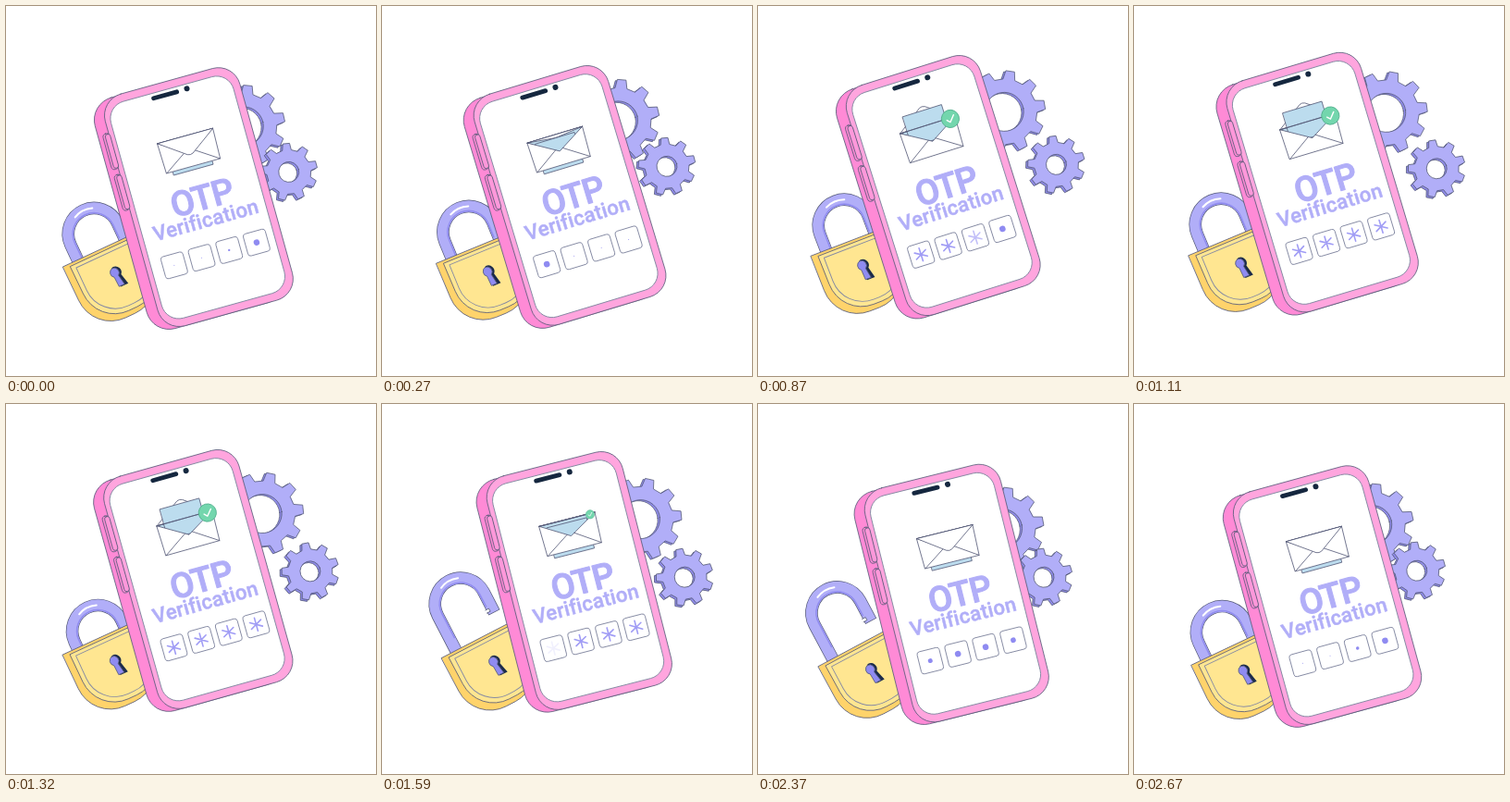
An HTML page for the animation above (2.7 s loop, 400 by 400 pixels).

```html
<!DOCTYPE html>
<html lang="en">
<head>
<meta charset="utf-8">
<title>OTP Verification</title>
<style>
  html, body { margin: 0; width: 100%; height: 100%; overflow: hidden; background: #fff; }
  svg { display: block; width: 100vw; height: 100vh; }
  .line { stroke: #555a78; stroke-width: .75; stroke-linejoin: round; stroke-linecap: round; }
  .soft { stroke: #858aa3; stroke-width: .9; stroke-linejoin: round; }
  .none { fill: none; }
  text {
    font-family: Roboto, "Open Sans", sans-serif; font-weight: 500; text-anchor: middle;
    fill: #b1aef8; stroke: #b1aef8; stroke-linejoin: round;
  }
</style>
</head>
<body>
<svg viewBox="0 0 400 400">
  <g id="bigGear"></g>
  <g id="smallGear"></g>

  <g id="lock">
    <g id="shackle" fill="none">
      <path d="M-32 6V-50A27.8 27.8 0 0 1 23.8-50V-25" stroke="#555a78" stroke-width="13.6"/>
      <path d="M-32 6V-50A27.8 27.8 0 0 1 23.8-50V-25.7" stroke="#b1aef8" stroke-width="12.2"/>
      <path d="M-27-20V-50A22.8 22.8 0 0 1 18.8-50V-34" stroke="#918df0" stroke-width="1.6"/>
      <path d="M-15-75Q-5-80 6-76" stroke="#fff" stroke-width="2" stroke-linecap="round"/>
      <path d="M16.4-31.5H20.5V-28H16.4" fill="#fff" class="line"/>
    </g>
    <path id="lockSide" class="line" fill="#ffd36b"/>
    <path id="lockFace" class="line" fill="#ffe691"/>
    <path id="lockRim" class="soft none"/>
    <path d="M-1-9A6.5 6.5 0 0 1 4 2L7 14H-2L-3 2A6.5 6.5 0 0 1-1-9Z" fill="#1b2b4b"/>
    <path d="M-2-8A5.4 5.4 0 0 1 1 1.8L3 13H-3.5L-4 1.8A5.4 5.4 0 0 1-2-8Z" fill="#8f8bf1" class="line"/>
  </g>

  <g id="phone">
    <g transform="translate(207 207) rotate(-15.5)">
      <rect x="-86" y="-129" width="154" height="259" rx="25" fill="#ff8ad6" class="line"/>
      <rect x="-74" y="-130" width="151" height="260" rx="24" fill="#ffa5de" class="line"/>
      <g class="line" fill="#ff8ad6">
        <rect x="-81" y="-93" width="7.5" height="40" rx="3.7"/>
        <rect x="-81" y="-47" width="7.5" height="40" rx="3.7"/>
        <rect x="-78.5" y="-92" width="5.5" height="38" rx="2.7" fill="#ff98da"/>
        <rect x="-78.5" y="-46" width="5.5" height="38" rx="2.7" fill="#ff98da"/>
      </g>
      <rect x="-68.5" y="-121.5" width="137.5" height="243" rx="19" fill="#fff" class="soft"/>
      <path d="M-17-116H9" stroke="#15273f" stroke-width="4.8" stroke-linecap="round"/>
      <circle cx="20.4" cy="-116.5" r="3" fill="#15273f"/>

      <path id="flapBack" fill="#fff" class="line"/>
      <path id="inside" d="M-26-67.5H36L5-47Z" fill="#bfdded" class="line"/>
      <path id="letter" d="M-18-64H26V-30H-18Z" fill="#bcdcee" class="line"/>
      <path d="M-26-67.5L5-49L36-67.5L35-34H-25Z" fill="#fff" class="line"/>
      <path d="M-25-34L1-51.4M35-34L9-51.4" class="line none"/>
      <path id="flapFront" fill="#fff" class="line"/>
      <g id="badge">
        <circle r="9.6" fill="#73d6ad" stroke="#4fae8b" stroke-width=".8"/>
        <path d="M-4 .5L-1 3.5L4.5-3" fill="none" stroke="#fff" stroke-width="1.4" stroke-linecap="round" stroke-linejoin="round"/>
      </g>

      <text x="4.5" y="14.5" font-size="37.5" letter-spacing="-.8" stroke-width="1.1">OTP</text>
      <text x="2.2" y="33.7" font-size="22.2" letter-spacing=".25" stroke-width=".5">Verification</text>
      <g id="code"></g>
    </g>
  </g>
</svg>
<script>
const LOOP = 2700;
const $ = id => document.getElementById(id);
const set = (el, name, value) => el.setAttribute(name, value);

function add(parent, tag, attrs) {
  const el = document.createElementNS('http://www.w3.org/2000/svg', tag);
  for (const k in attrs) set(el, k, attrs[k]);
  return parent.appendChild(el);
}

// Smooth step from 0 to 1 between a and b
function ramp(t, a, b) {
  const p = Math.min(1, Math.max(0, (t - a) / (b - a)));
  return p * p * (3 - 2 * p);
}

// Value eased through [time, value] pairs
function keyed(t, keys) {
  let v = keys[0][1];
  for (let i = 1; i < keys.length; i++)
    v += (keys[i][1] - keys[i - 1][1]) * ramp(t, keys[i - 1][0], keys[i][0]);
  return v;
}

function gearPath(teeth, root, tip, hole) {
  const step = 2 * Math.PI / teeth, pts = [];
  for (let i = 0; i < teeth; i++)
    for (const [off, r] of [[-.29, root], [-.17, tip], [.17, tip], [.29, root]]) {
      const a = (i + off) * step;
      pts.push((r * Math.cos(a)).toFixed(2) + ' ' + (r * Math.sin(a)).toFixed(2));
    }
  return `M${pts.join('L')}ZM${hole} 0A${hole} ${hole} 0 1 0 ${-hole} 0A${hole} ${hole} 0 1 0 ${hole} 0Z`;
}

function makeGear(id, ...shape) {
  const d = gearPath(...shape), common = { d, class: 'line', 'fill-rule': 'evenodd' };
  add($(id), 'path', { ...common, fill: '#8f8bea', transform: 'translate(-2.4 .8)' });
  add($(id), 'path', { ...common, fill: '#b1aef8' });
}
makeGear('bigGear', 10, 35.5, 44.5, 21);
makeGear('smallGear', 9, 24, 31, 11);

const shield = (l, r, top, bottom, c) =>
  `M${l} ${top}H${r}V${bottom - c}A${c} ${c} 0 0 1 ${r - c} ${bottom}H${l + c}A${c} ${c} 0 0 1 ${l} ${bottom - c}Z`;
set($('lockSide'), 'd', shield(-49.5, 38, -32, 46.5, 38));
set($('lockFace'), 'd', shield(-42, 42, -29, 41, 37));
set($('lockRim'), 'd', shield(-37, 38, -25, 36, 34));

const cells = [0, 1, 2, 3].map(i => {
  const g = add($('code'), 'g', { transform: `translate(${2.4 + (i - 1.5) * 30.8} 64)` });
  add(g, 'rect', { x: -12.3, y: -12.3, width: 24.6, height: 24.6, rx: 3, fill: '#fff', class: 'soft' });
  const dot = add(g, 'circle', { fill: '#8f8bf1' });
  const star = add(g, 'path', {
    d: 'M0-7.2V7.2M-6.2-3.6L6.2 3.6M-6.2 3.6L6.2-3.6',
    stroke: '#a09cf5', 'stroke-width': 1.6, 'stroke-linecap': 'round'
  });
  return { dot, star };
});

function drawCell({ dot, star }, i, t) {
  const on = 460 + 200 * i, off = 1500 + 130 * i;
  const shown = ramp(t, on - 60, on + 60) * (1 - ramp(t, off, off + 120));
  const typed = ramp(t, on - 390, on - 190) * (1 - ramp(t, on - 50, on + 20));
  const wave = s => ramp(s, 1790 + 130 * i, 2040 + 130 * i) *
    (1 - ramp(s, 2290 + 130 * i, 2540 + 130 * i));
  const size = Math.max(typed, wave(t), wave(t + LOOP));
  const idle = t < on - 50 || t > 2400 ? .5 : 0;
  set(dot, 'r', Math.max(idle, 3.3 * size));
  set(star, 'opacity', shown);
}

function flap(s) {
  const y = -67.5 + 21.5 * s;
  return `M-26-67.5L2 ${y - 1.5 * s}Q5 ${y} 8 ${y - 1.5 * s}L36-67.5Z`;
}

function draw(t) {
  const w = 2 * Math.PI * t / LOOP, sin = Math.sin(w), cos = Math.cos(w);

  const lag = w - .56, turn = Math.cos(lag);
  set($('bigGear'), 'transform',
    `translate(${267.5 - 12 * turn} ${124.6 - 10.3 * Math.sin(lag)}) rotate(${-9.3 - 4 * turn})`);
  set($('smallGear'), 'transform',
    `translate(${317.4 - 11.6 * cos} ${180.5 - 10.8 * Math.sin(w + .1)}) rotate(${-18 + 3 * turn})`);

  set($('phone'), 'transform', `translate(0 ${8.6 * (cos - 1)}) rotate(${-2.2 * sin} 200 445)`);

  set($('lock'), 'transform',
    `translate(${120 - 5.7 * sin} ${290 + 5.3 * (cos - 1)}) rotate(${-25 + 4.5 * sin})`);
  const lift = keyed(t, [[1080, 0], [1310, -11], [1530, 27], [1680, 20], [2130, 20],
    [2310, 32], [2500, -4], [2640, 0]]);
  set($('shackle'), 'transform', `translate(0 ${-lift})`);

  const s = keyed(t, [[150, 1], [420, -1], [1480, -1], [1700, 1]]);
  set($('flapBack'), 'd', flap(Math.min(0, s)));
  set($('flapFront'), 'd', flap(Math.max(0, s)));
  const out = keyed(t, [[450, 0], [750, 1], [1380, 1], [1560, 0]]);
  set($('letter'), 'transform', `translate(0 ${-20 * out})`);
  const pop = keyed(t, [[700, 0], [810, 1.1], [870, 1], [1500, 1], [1680, 0]]);
  set($('badge'), 'transform', `translate(30.5 -66.5) scale(${pop})`);

  cells.forEach((c, i) => drawCell(c, i, t));
}

const start = performance.now();
function tick() {
  draw((performance.now() - start) % LOOP);
  requestAnimationFrame(tick);
}
tick();
</script>
</body>
</html>
```
